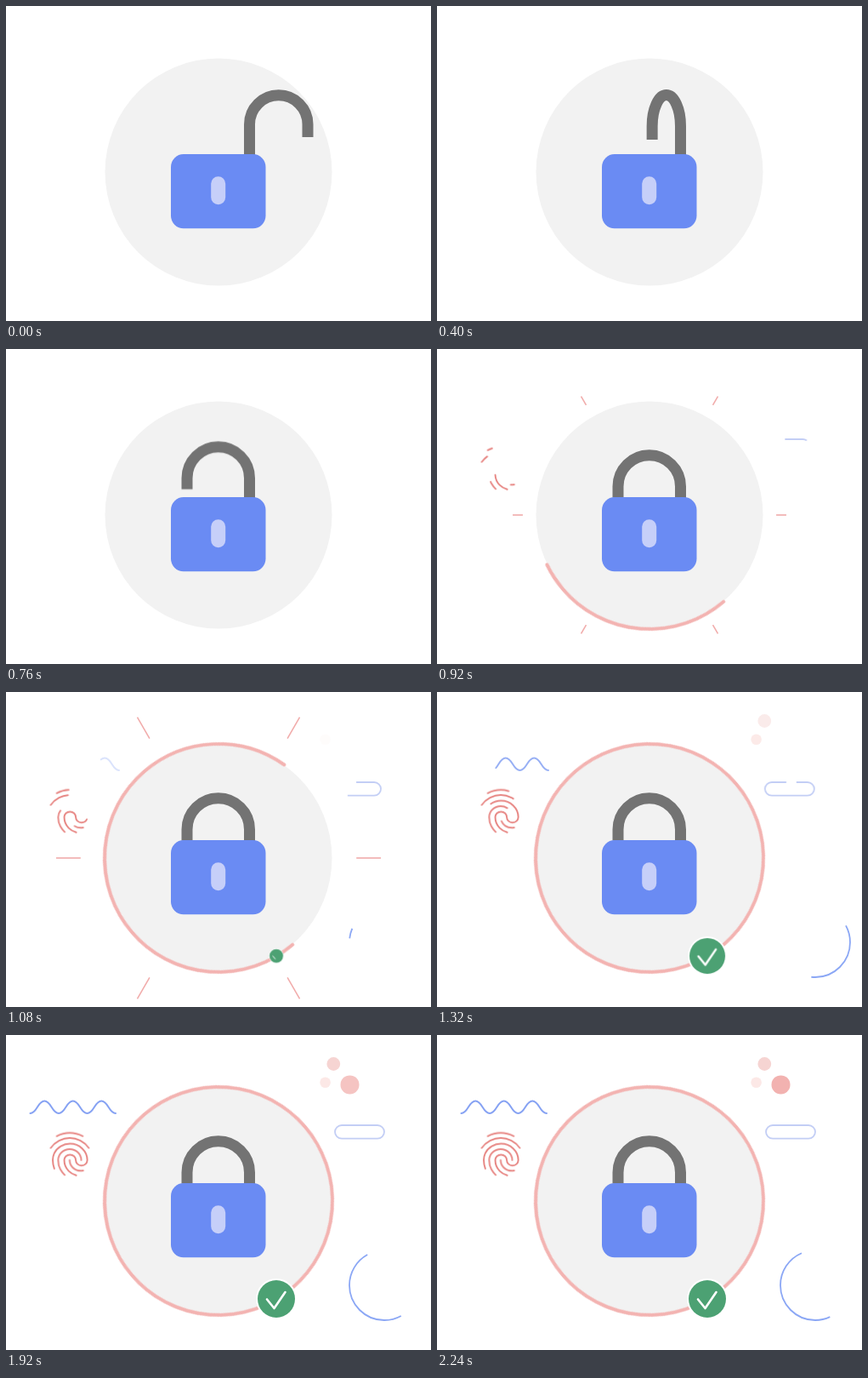
Animation, 500 px wide and 370 px high, one loop 3000 ms. Source, as an HTML page without scripts:

```html
<!DOCTYPE html>
<html lang="en">
<head>
<meta charset="utf-8">
<title>Lock</title>
<style>
html, body { margin: 0; width: 100%; height: 100%; overflow: hidden; background: #fff; }
svg { display: block; width: 500px; height: 370px; }
svg * { animation-duration: 3s; animation-iteration-count: infinite; animation-timing-function: linear; }
.line { fill: none; stroke-linecap: round; stroke-linejoin: round; }

/* shackle swings over, then drops */
.shackle { stroke: #737373; stroke-width: 13; stroke-linecap: butt; animation-name: swing; }
.drop { animation-name: drop; }
@keyframes swing {
  0%, 8% { d: path("M286.5 180V139C286.5 120.1 301.8 104.75 320.75 104.75S355 120.1 355 139V154"); }
  13.333% {
    d: path("M286.5 180V141C286.5 120.9 279.1 104.6 270 104.6S253.5 120.9 253.5 141V157");
    animation-timing-function: ease-out;
  }
  20%, 100% { d: path("M286.5 180V141.5C286.5 121.2 270 104.75 249.75 104.75S213 121.2 213 141.5V154.5"); }
}
@keyframes drop {
  0%, 22.667% { transform: translateY(0); animation-timing-function: ease-in; }
  25.333% { transform: translateY(10px); }
  26.8%, 100% { transform: translateY(20px); }
}

.ring { stroke: #f3b3b1; stroke-width: 4; animation-name: ring; }
@keyframes ring {
  0%, 27% { stroke-dasharray: 0 400; opacity: 0; }
  28% { opacity: 1; }
  36% { stroke-dasharray: 255 400; animation-timing-function: ease-out; }
  43%, 100% { stroke-dasharray: 361 400; opacity: 1; }
}

.rays { stroke: #f1acab; stroke-width: 1.6; }
.rays line { animation-name: ray; }
@keyframes ray {
  0%, 27% { stroke-dasharray: 0 100; stroke-dashoffset: 0; }
  36% { stroke-dasharray: 29 100; stroke-dashoffset: -22; }
  43%, 100% { stroke-dasharray: 0 100; stroke-dashoffset: -61; }
}

.badge { transform-origin: 318px 310px; animation-name: pop; }
.tick { stroke: #fff; stroke-width: 2.6; animation-name: tick; }
@keyframes pop {
  0%, 33% { transform: scale(0); }
  36% { transform: scale(.36); animation-timing-function: ease-out; }
  44% { transform: scale(.955); animation-timing-function: ease-out; }
  49%, 100% { transform: scale(1); }
}
@keyframes tick {
  0%, 34% { stroke-dasharray: 0 2; opacity: 0; }
  36% { stroke-dasharray: .32 2; opacity: 1; }
  43%, 100% { stroke-dasharray: 1.1 2; opacity: 1; }
}

.print { stroke: #e78683; stroke-width: .74; }
.print path { animation-name: print; }
@keyframes print {
  0%, 27.5% { stroke-dasharray: 0 2; opacity: 0; }
  29% { opacity: 1; }
  36% { stroke-dasharray: .46 2; }
  44% { stroke-dasharray: .8 2; animation-timing-function: ease-out; }
  54.667% { stroke-dasharray: .96 2; animation-timing-function: ease-out; }
  64%, 100% { stroke-dasharray: 1.1 2; opacity: 1; }
}

.wave { stroke: #86a2f3; stroke-width: 2; animation-name: wave; }
@keyframes wave {
  0%, 33% { stroke-dasharray: 0 2; opacity: 0; transform: translateX(6px); }
  36% { stroke-dasharray: .2 2; opacity: .3; transform: translateX(4px); }
  44% { stroke-dasharray: .62 2; opacity: .85; transform: translateX(2px); animation-timing-function: ease-out; }
  54.667% { stroke-dasharray: .935 2; opacity: 1; transform: none; animation-timing-function: ease-out; }
  64%, 100% { stroke-dasharray: 1.1 2; opacity: 1; transform: none; }
}

.pill { stroke: #c3cef5; stroke-width: 1.8; stroke-linecap: butt; animation-name: pill; }
@keyframes pill {
  0%, 28% { stroke-dasharray: 0 134; stroke-dashoffset: 0; transform: translateX(-8px); }
  36% { stroke-dasharray: 77 57; stroke-dashoffset: 0; transform: translateX(-4px); }
  44% { stroke-dasharray: 122 12; stroke-dashoffset: -8; transform: translateX(-1.2px); animation-timing-function: ease-out; }
  50%, 100% { stroke-dasharray: 134 0; stroke-dashoffset: -10; transform: none; }
}

.arc { stroke: #8ba7f5; stroke-width: 1.8; stroke-linecap: butt; animation-name: arc; }
@keyframes arc {
  0%, 34.667% { stroke-dasharray: 0 360; stroke-dashoffset: 190; }
  36% { stroke-dasharray: 16 344; stroke-dashoffset: 174; }
  44% { stroke-dasharray: 125 235; stroke-dashoffset: 29; animation-timing-function: ease-out; }
  54.667% { stroke-dasharray: 168 192; stroke-dashoffset: -38; animation-timing-function: cubic-bezier(.1, .6, .4, 1); }
  74.667%, 100% { stroke-dasharray: 182 178; stroke-dashoffset: -65; }
}

.dot1 { fill: #f6d4d2; animation-name: dot1; }
.dot2 { fill: #fce8e6; animation-name: dot2; }
.dot3 { fill: #f2b2b0; animation-name: dot3; }
@keyframes dot1 {
  0%, 37% { opacity: 0; }
  44% { opacity: .45; }
  54.667% { opacity: .82; }
  65%, 100% { opacity: 1; }
}
@keyframes dot2 {
  0%, 35% { opacity: 0; }
  36% { opacity: .12; }
  44% { opacity: .9; }
  50%, 100% { opacity: 1; }
}
@keyframes dot3 {
  0%, 45% { opacity: 0; }
  54.667% { opacity: .56; }
  74.667%, 100% { opacity: 1; }
}
</style>
</head>
<body>
<svg viewBox="0 0 500 370" xmlns="http://www.w3.org/2000/svg">
  <circle cx="250" cy="195" r="133.5" fill="#f2f2f2"/>

  <g class="rays" transform="translate(250 195)">
    <line x1="140" x2="201"/>
    <line x1="140" x2="201" transform="rotate(60)"/>
    <line x1="140" x2="201" transform="rotate(120)"/>
    <line x1="140" x2="201" transform="rotate(180)"/>
    <line x1="140" x2="201" transform="rotate(240)"/>
    <line x1="140" x2="201" transform="rotate(300)"/>
  </g>
  <circle class="line ring" cx="250" cy="195" r="134" pathLength="360" transform="rotate(49.4 250 195)"/>

  <g class="drop">
    <path class="line shackle" d="M286.5 180V139C286.5 120.1 301.8 104.75 320.75 104.75S355 120.1 355 139V154"/>
  </g>
  <rect x="194" y="174" width="111.5" height="87.3" rx="15" fill="#6a8bf3"/>
  <rect x="241.2" y="200.3" width="17" height="33" rx="8.5" fill="#c6cff9"/>

  <g class="badge">
    <circle cx="318" cy="310" r="24" fill="#fff"/>
    <circle cx="318" cy="310" r="22" fill="#4ca173"/>
    <path class="line tick" pathLength="1" d="M307 310.5L315.5 321L328.5 302"/>
  </g>

  <path class="line wave" pathLength="1" d="M129 92c-8 0-8.75-14.5-16.75-14.5s-8.75 14.5-16.75 14.5s-8.75-14.5-16.75-14.5s-8.75 14.5-16.75 14.5s-8.75-14.5-16.75-14.5s-8.75 14.5-16.75 14.5"/>

  <g class="line print" transform="translate(43.44 108.4) scale(2.63)">
    <path pathLength="1" d="M6.2 3.97C8 3 9.95 2.5 12 2.5c2 0 3.8.46 5.8 1.47"/>
    <path pathLength="1" d="M3.5 9.22C4.5 7.85 5.75 6.75 7.25 5.98c3-1.55 6.5-1.55 9.5 0 1.5.77 2.75 1.86 3.75 3.24"/>
    <path pathLength="1" d="M9.75 21.29c-.8-.8-1.25-1.35-1.93-2.53-.65-1.16-.99-2.57-.99-4.1 0-2.7 2.3-4.89 5.16-4.89s5.16 2.19 5.16 4.89"/>
    <path pathLength="1" d="M18 19.35c-.4.07-.8.1-1.04.1-3 0-5-2.3-5-4.8"/>
    <path pathLength="1" d="M14.91 21.5c-1.5-.42-2.45-.98-3.4-1.95-1.3-1.3-1.99-3.02-1.99-4.87 0-1.34 1.15-2.44 2.58-2.44s2.58 1.1 2.58 2.44c0 1.35 1.16 2.44 2.58 2.44s2.58-1.09 2.58-2.44c0-4.05-3.47-7.33-7.75-7.33-3 0-5.8 1.7-7.06 4.32-.43.9-.64 1.9-.64 3.01 0 .85.08 2.15.7 3.8"/>
  </g>

  <circle class="dot1" cx="385.3" cy="34" r="7.9"/>
  <circle class="dot2" cx="375.6" cy="55.8" r="6.3"/>
  <circle class="dot3" cx="404.5" cy="58.4" r="11"/>

  <path class="line pill" pathLength="134" d="M416 106H437a8 7.8 0 0 1 0 15.6H395a8 7.8 0 0 1 0-15.6Z"/>
  <circle class="line arc" cx="445" cy="294" r="41" pathLength="360"/>
</svg>
</body>
</html>
```
